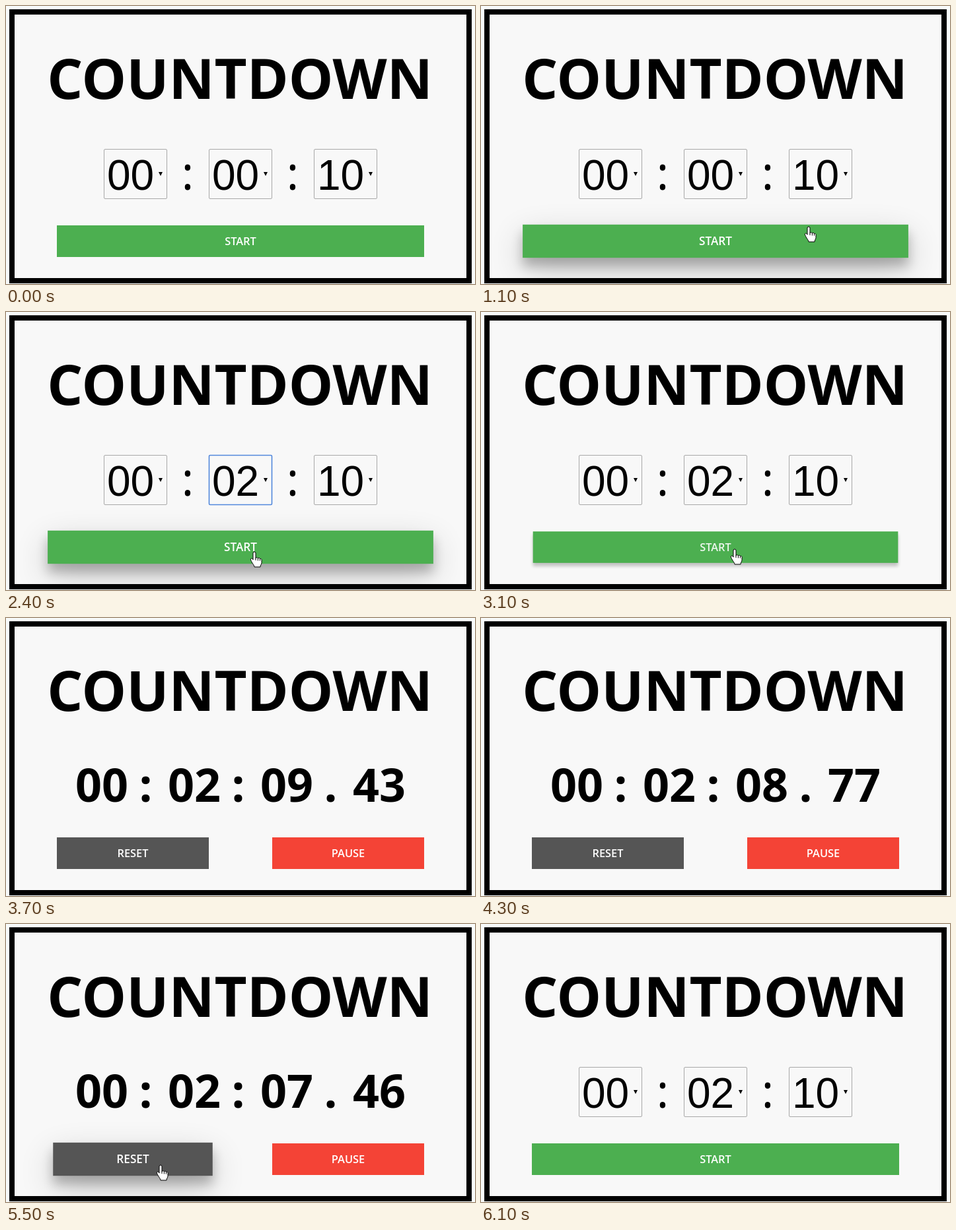
Write an HTML page that moves like this. It is 710 px wide and 422 px high and loops after 7.5 s.

```html
<!DOCTYPE html>
<html lang="en">
<head>
<meta charset="utf-8">
<title>Countdown</title>
<style>
  html, body { margin: 0; width: 100%; height: 100%; overflow: hidden; background: #f9fcfc; }
  svg { display: block; width: 100%; height: 100%; }
  text { font-family: "Open Sans", "Noto Sans", sans-serif; }
  .bold { font-weight: 700; }
  .arial { font-family: "Liberation Sans", Arial, sans-serif; }
  .mid { text-anchor: middle; }
  .label { font-size: 16.4px; font-weight: 600; fill: #fff; }
</style>
</head>
<body>
<svg id="stage" viewBox="0 0 710 422"></svg>
<script>
const LOOP = 7500, STEP = 100;
const OPEN = 1500, PICK = 2200, PRESS_START = 3100, RUN = 3200, PRESS_RESET = 5600, STOP = 5700;
const GREY = '#a9a9a9', BLUE = '#5288dc';
const stage = document.getElementById('stage');

function add(parent, tag, attrs = {}, text) {
  const el = document.createElementNS('http://www.w3.org/2000/svg', tag);
  for (const k in attrs) el.setAttribute(k, attrs[k]);
  if (text !== undefined) el.textContent = text;
  parent.appendChild(el);
  return el;
}
const group = parent => add(parent, 'g');
const show = (el, on) => el.setAttribute('display', on ? 'inline' : 'none');
const within = (t, a, b) => t >= a && t < b;
const ease = u => u * u * (3 - 2 * u);

function makeButton(parent, x, w, color, label) {
  const g = group(parent);
  const box = { x, y: 333, width: w, height: 48 };
  const far = add(g, 'rect', box);
  const near = add(g, 'rect', box);
  add(g, 'rect', { ...box, fill: color });
  const cx = x + w / 2, cy = 357;
  const text = add(g, 'text', { x: cx, y: 363, class: 'label mid' }, label);
  const shadow = (el, dy, blur, alpha) => {
    el.setAttribute('transform', `translate(0 ${dy})`);
    el.style.filter = `blur(${blur}px)`;
    el.setAttribute('opacity', alpha);
    show(el, alpha > 0);
  };
  return {
    over: ([px, py]) => px >= x && px <= x + w && py >= 333 && py <= 381,
    set(hover, pressed) {
      const s = pressed ? 0.994 : 1 + 0.05 * hover;
      g.setAttribute('transform', `translate(${cx} ${cy}) scale(${s}) translate(${-cx} ${-cy})`);
      text.setAttribute('opacity', pressed ? 0.9 : 1);
      if (pressed) shadow(near, 5, 2.5, 0.22);
      else shadow(near, 12 * hover, 8, 0.24 * hover);
      shadow(far, 17 * hover, 25, pressed ? 0 : 0.19 * hover);
    }
  };
}

function makeSelect(parent, x, value) {
  const frame = add(parent, 'rect', {
    x: x + 0.5, y: 217.5, width: 95, height: 75, rx: 1.5, fill: '#f8f8f8', stroke: GREY
  });
  const text = add(parent, 'text', { x: x + 5, y: 279, 'font-size': 64, class: 'arial' }, value);
  add(parent, 'path', { d: `M${x + 83} 252h6l-3 6z` });
  return { frame, text };
}

// Card and title
add(stage, 'rect', { x: 9, y: 9, width: 692, height: 408, fill: '#f8f8f8', stroke: '#000', 'stroke-width': 8 });
add(stage, 'text', { x: 354, y: 141, 'font-size': 85, class: 'bold mid' }, 'COUNTDOWN');

// Setup view
const setup = group(stage);
const start = makeButton(setup, 77, 556, '#4caf50', 'START');
const [, minutes] = ['00', '00', '10'].map((s, i) => makeSelect(setup, 148 + 159 * i, s));
for (const x of [275, 434]) add(setup, 'text', { x, y: 279, 'font-size': 71, class: 'mid' }, ':');

// Minutes list
const ROW = 39.4, LIST_TOP = 294;
const list = group(setup);
add(list, 'rect', { x: 307.5, y: 292.5, width: 95, height: 140, fill: '#f8f9fd', stroke: BLUE });
const mark = add(list, 'rect', { x: 308, width: 77, height: 39, fill: '#1e90ff' });
const items = ['00', '01', '02', '03'].map((s, i) =>
  add(list, 'text', { x: 312, y: 323 + ROW * i, 'font-size': 32, class: 'arial' }, s));
add(list, 'rect', { x: 385, y: 293, width: 17, height: 130, fill: '#f1f1f1' });
add(list, 'path', { d: 'M389 305l4-4 4 4z', fill: '#a3a3a3' });
add(list, 'rect', { x: 387, y: 311, width: 13, height: 112, fill: '#c1c1c1' });

// Running view: four values with a separator between each pair
const running = group(stage);
const reset = makeButton(running, 77, 230, '#555', 'RESET');
const pause = makeButton(running, 403, 230, '#f44336', 'PAUSE');
const clock = Array.from({ length: 7 }, (_, i) =>
  add(running, 'text', { x: 145 + 70 * i - (i % 2 ? 3.5 : 0), y: 279, 'font-size': 70, class: 'bold mid' }));

// Pointers
const ink = { fill: '#fff', stroke: '#000', 'stroke-linejoin': 'round' };
const arrow = add(stage, 'path', { ...ink, d: 'M.5 .5V16.5l3.7-3.6 2.6 6 2.6-1.1-2.6-5.8h5.2z' });
const hand = group(stage);
add(hand, 'path', {
  ...ink,
  d: 'M-2 2a2 2 0 0 1 4 0v7.5c.6-1 3-1 3.4.3.8-.8 2.8-.5 3.1.8.9-.6 2.5 0 2.5 1.7v4.2' +
     'c0 2.5-2 3.5-2 6.5H0c0-2.5-2.7-4.5-4.5-8.5-.8-1.8-1.6-3.2-.8-4 1-.9 2.3-.2 3.3 1.6z'
});
add(hand, 'path', { d: 'M2 9v4M5.4 10v3.5M8.4 10.6v3', stroke: '#000', fill: 'none' });

// Pointer moves, eased from wherever the last one ended
const ENTRY = [696, 390];
const MOVES = [
  { at: 700, dur: 300, to: [540, 360] },
  { at: 1000, dur: 300, to: [372, 262] },
  { at: OPEN, dur: 500, to: [355, 377] },
  { at: PICK, dur: 300, to: [384, 360] },
  { at: PRESS_START, dur: 600, to: [700, 320] },
  { at: 3700, dur: 100, to: [697, 372] },
  { at: 4700, dur: 700, to: [234, 366] },
  { at: 5800, dur: 200, to: [231, 388] }
];

function pointer(t) {
  return MOVES.reduce((pos, { at, dur, to }) => {
    const k = ease(Math.min(1, Math.max(0, (t - at) / dur)));
    return pos.map((v, i) => v + (to[i] - v) * k);
  }, ENTRY);
}

const isRunning = t => within(t, RUN, STOP);
const isOpen = t => within(t, OPEN, PICK);

// Button under the pointer
function hot(t) {
  if (isOpen(t)) return undefined;
  return (isRunning(t) ? [reset, pause] : [start]).find(b => b.over(pointer(t)));
}

// Hover fades over two steps
const hover = (button, t) => ((hot(t) === button) + (hot(t - STEP) === button)) / 2;

const pad = n => String(n).padStart(2, '0');

function drawClock(t) {
  const left = Math.round(12943 - (t - 3700) * 0.1097);
  const sec = Math.floor(left / 100);
  const parts = ['00', ':', pad(Math.floor(sec / 60)), ':', pad(sec % 60), '.', pad(left % 100)];
  clock.forEach((el, i) => { el.textContent = parts[i]; });
}

function drawSetup(t, y) {
  start.set(hover(start, t), t === PRESS_START);
  const focus = within(t, OPEN, PRESS_START);
  minutes.text.textContent = t < PICK ? '00' : '02';
  minutes.frame.setAttribute('stroke', focus ? BLUE : GREY);
  minutes.frame.setAttribute('stroke-width', focus ? 1.6 : 1);
  show(list, isOpen(t));
  const row = Math.max(0, Math.floor((y - LIST_TOP) / ROW));
  mark.setAttribute('y', Math.round(LIST_TOP + ROW * row));
  items.forEach((el, i) => el.setAttribute('fill', i === row ? '#fff' : '#000'));
}

function draw(ms) {
  const t = Math.floor(ms / STEP) * STEP;
  const live = isRunning(t);
  const [x, y] = pointer(t).map(Math.round);

  show(setup, !live);
  show(running, live);
  if (live) {
    drawClock(t);
    pause.set(hover(pause, t), false);
    reset.set(hover(reset, t), t === PRESS_RESET);
  } else {
    drawSetup(t, y);
  }

  const visible = within(t, 700, 3700) || within(t, 4700, 6100);
  show(arrow, visible && !hot(t));
  show(hand, visible && hot(t));
  for (const el of [arrow, hand]) el.setAttribute('transform', `translate(${x} ${y})`);
}

const begin = performance.now();
function tick() {
  draw((performance.now() - begin) % LOOP);
  requestAnimationFrame(tick);
}
tick();
</script>
</body>
</html>
```
